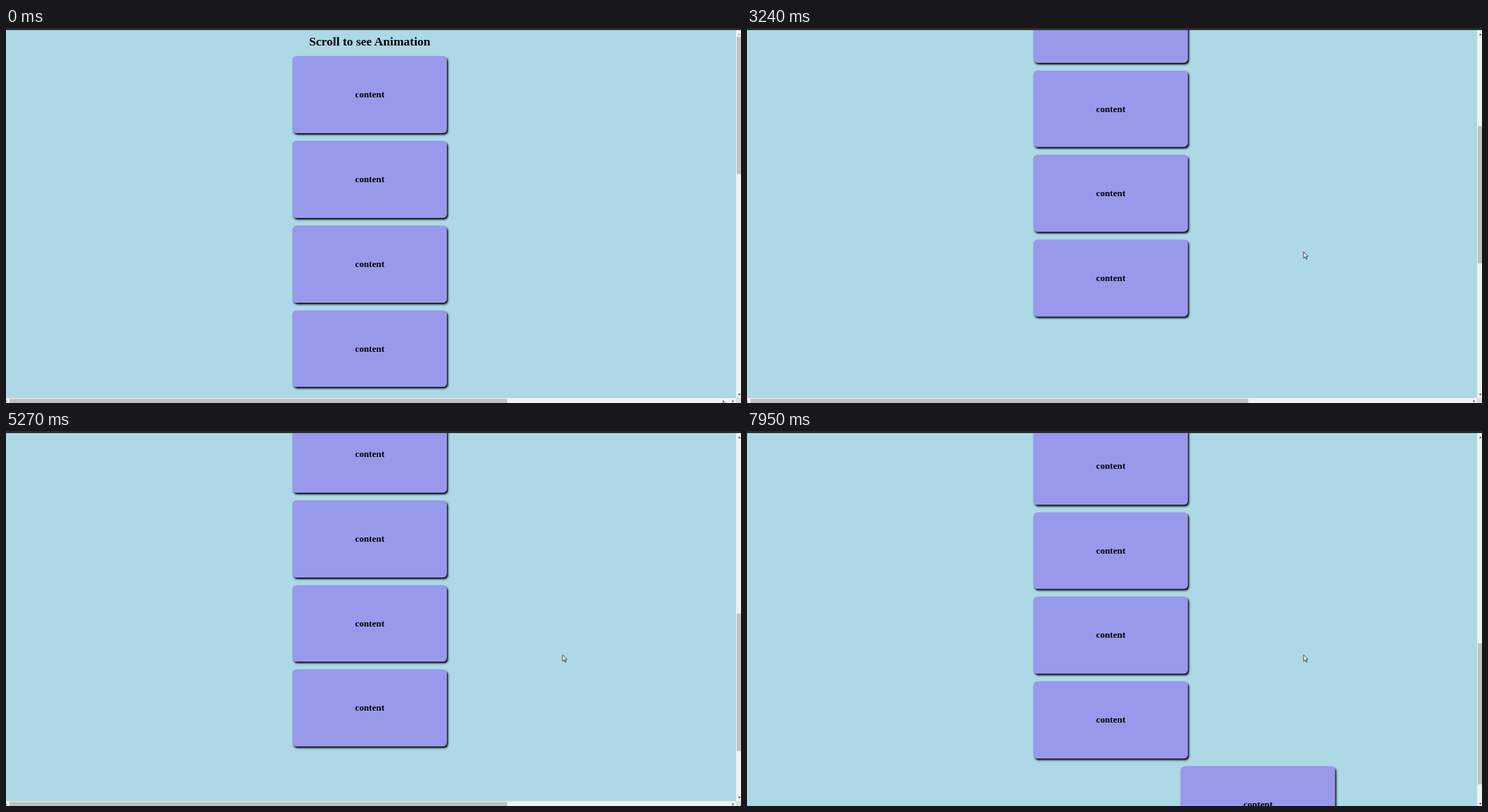
An HTML page for the animation above (8000 ms loop, 1047 by 535 pixels).

```html
<!DOCTYPE html>
<html lang="en">
<head>
<meta charset="utf-8">
<title>Scroll to see Animation</title>
<style>
  html, body { margin: 0; width: 100%; height: 100%; overflow: hidden; }
  #stage { position: relative; width: 1047px; height: 535px; overflow: hidden; background: #f1f1f1; }
  #stage div { position: absolute; }
  #top { left: 0; top: 0; width: 1047px; height: 3px; background: #2c2b30; }
  #view { left: 0; top: 3px; width: 1040px; height: 525px; overflow: hidden; background: #add8e6; }
  #page { left: 0; top: -3px; width: 1040px; height: 1364px;
    font: bold 13.18px "Liberation Serif", "Times New Roman", serif; color: #000; text-align: center; }
  #title { left: 318.2px; top: 9px; width: 400px; line-height: 20px; font-size: 17.57px; }
  .card { left: 408.4px; width: 219.6px; height: 109.8px; line-height: 110.6px; border-radius: 5.5px;
    background: #9999ec; box-shadow: 1.65px 2.2px 2.75px #000; }
  .thumb { background: #c1c1c1; }
  #vThumb { left: 1041px; top: 0; width: 6px; }
  #hBar { left: 0; top: 528px; width: 1040px; height: 7px; background: #f1f1f1; }
  #hThumb { left: 5px; top: 1px; width: 709px; height: 6px; }
  #corner { left: 1040px; top: 528px; width: 7px; height: 7px; background: #dcdcdc; }
  svg { position: absolute; left: 0; top: 0; }
</style>
</head>
<body>
<div id="stage">
  <div id="view"><div id="page"><div id="title">Scroll to see Animation</div></div></div>
  <div id="vThumb" class="thumb"></div>
  <div id="hBar"><div id="hThumb" class="thumb"></div></div>
  <div id="corner"></div>
  <div id="top"></div>
  <svg width="1047" height="535">
    <path id="up" d="M1042.7 10.2h4l-2-2.4z"/>
    <path id="down" d="M1042.7 521.8h4l-2 2.4z" fill="#505050"/>
    <g id="hArrows">
      <path d="M1.2 530.4v4l-2-2z" fill="#a3a3a3"/>
      <path d="M1034.6 530.4v4l2.4-2z" fill="#505050"/>
    </g>
    <path id="cursor" d="M.4.4v9l2.1-1.9 1.5 3.3 1.3-.6-1.5-3.2h2.8z" fill="#fff" stroke="#000" stroke-width=".7"/>
  </svg>
</div>
<script>
const LOOP = 8000, PAGE = 1364, VIEW = 532, BAR = 7;
const FIRST = 40.3, PITCH = 120.75, RIGHT = 628, AWAY = 878, SLIDE = 400;
const TRIGGER = 3 + VIEW * .796;

// Each turn of the wheel by one notch scrolls smoothly
const NOTCH = 54.9, GLIDE = 200;
const DOWN = [1020, 1480, 1790, 2270, 2430, 2830, 3178, 3750, 4067, 4560, 4660, 4850, 5226, 5720, 6021, 6250];
const UP = [7842, 7842];

const $ = id => document.getElementById(id);
const clamp = x => Math.min(1, Math.max(0, x));
const smooth = x => x * x * (3 - 2 * x);
const bezier = (u, a, b) => 3 * (1 - u) * (1 - u) * u * a + 3 * (1 - u) * u * u * b + u * u * u;

// CSS "ease"
function ease(x) {
  if (x <= 0 || x >= 1) return clamp(x);
  let lo = 0, hi = 1;
  for (let i = 0; i < 24; i++) {
    const mid = (lo + hi) / 2;
    if (bezier(mid, .25, .25) < x) lo = mid; else hi = mid;
  }
  return bezier(lo, .1, 1);
}

const rolled = (turns, t) =>
  turns.reduce((sum, start) => sum + NOTCH * smooth(clamp((t - start) / GLIDE)), 0);
const scrollAt = t => Math.min(PAGE - VIEW, rolled(DOWN, t)) - rolled(UP, t);

function firstTime(from, test) {
  for (let t = from; t < LOOP; t++) if (test(t)) return t;
  return Infinity;
}

// A card slides in when its top rises past the trigger line, and out when it drops below
function makeCard(k) {
  const top = FIRST + k * PITCH;
  const above = t => top - scrollAt(t) < TRIGGER;
  const shown = firstTime(0, above) || -SLIDE;
  const hidden = firstTime(Math.max(0, shown), t => !above(t));
  const el = document.createElement("div");
  el.className = "card";
  el.textContent = "content";
  el.style.top = top + "px";
  $("page").append(el);
  const offset = t => {
    const away = t < hidden ? 1 - ease((t - shown) / SLIDE) : ease((t - hidden) / SLIDE);
    return away * AWAY * (k % 2 ? -1 : 1);
  };
  return { el, offset };
}

const cards = Array.from({ length: 11 }, (_, k) => makeCard(k));

function draw(t) {
  const scroll = scrollAt(t), offsets = cards.map(card => card.offset(t));
  $("page").style.transform = `translateY(${-scroll}px)`;
  cards.forEach((card, k) => card.el.style.transform = `translateX(${offsets[k]}px)`);

  // The horizontal bar shows while a card sticks out on the right
  const bar = RIGHT + Math.max(...offsets) > 1040;
  const height = bar ? VIEW - BAR : VIEW, track = height - 17;
  $("view").style.height = height + "px";
  for (const id of ["hBar", "corner", "hArrows"]) $(id).style.display = bar ? "" : "none";
  $("vThumb").style.height = track * height / PAGE + "px";
  $("vThumb").style.transform = `translateY(${12.5 + scroll * track / PAGE}px)`;
  $("up").setAttribute("fill", scroll > 0 ? "#505050" : "#a3a3a3");
  $("down").setAttribute("transform", `translate(0 ${bar ? 0 : 9})`);

  const p = smooth(clamp(t / 480));
  $("cursor").setAttribute("transform", `translate(${1021.3 - 228.8 * p} ${531.3 - 212.3 * p})`);
}

const start = performance.now();
function tick() {
  draw((performance.now() - start) % LOOP);
  requestAnimationFrame(tick);
}
tick();
</script>
</body>
</html>
```
